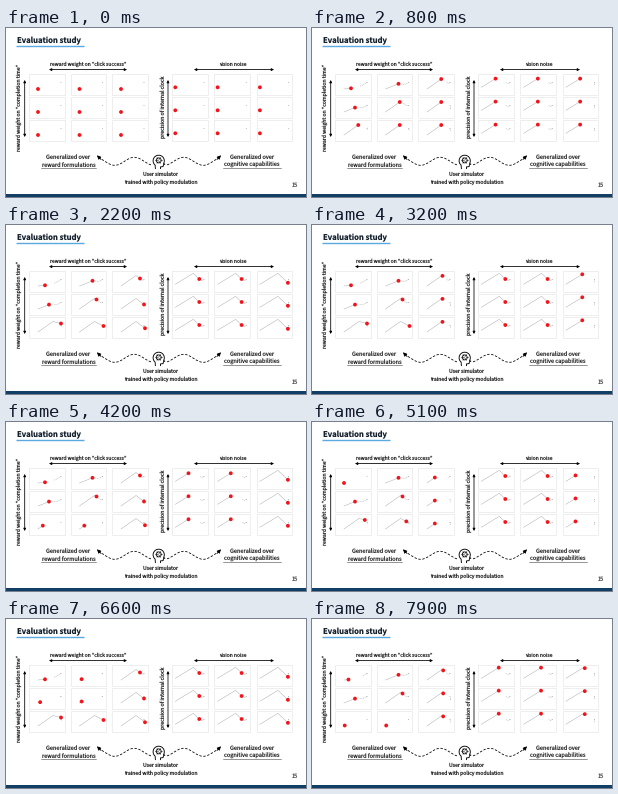
These frames come from a looping animation (300 px wide and 169 px high, 8 s). A matplotlib script:

```python
import numpy as np
import matplotlib.pyplot as plt
from matplotlib.animation import FuncAnimation
from matplotlib.patches import Circle, Rectangle

W, H, DPI = 300, 169, 100
PX = 72 / DPI
FRAMES, STEP = 80, 100
SPEED = 0.0178  # px per ms
INK, NAVY, BLUE, RED = "#303030", "#123f66", "#5aa9e0", "#f3131b"
GREY, PALE = "#b0b0b0", "#dedede"

plt.rcParams["font.family"] = ["Noto Sans CJK JP", "DejaVu Sans"]
plt.rcParams["text.hinting"] = "none"

fig = plt.figure(figsize=(W / DPI, H / DPI), dpi=DPI, facecolor="white")
ax = fig.add_axes([0, 0, 1, 1])
ax.set_xlim(0, W)
ax.set_ylim(H, 0)
ax.axis("off")


def text(x, y, s, size=5, **kw):
    kw = {"ha": "center", "va": "baseline", "color": INK, **kw}
    ax.text(x, y, s, fontsize=size * PX, **kw)


def line(xs, ys, color=INK, lw=0.5, **kw):
    return ax.plot(xs, ys, color=color, lw=lw * PX, **kw)[0]


def arrow(a, b, style="<|-|>", size=3.6):
    ax.annotate("", b, a, arrowprops=dict(
        arrowstyle=style, mutation_scale=size, lw=0.8 * PX,
        color="black", shrinkA=0, shrinkB=0))


def slide():
    text(11, 15, "Evaluation study", 7.7, ha="left", weight="bold", color="#15212d")
    line([10, 78], [18, 18], BLUE, 1.4, solid_capstyle="butt")
    ax.add_patch(Rectangle((0, 166.4), W, 3, color=NAVY, lw=0))
    text(288.5, 159.3, "15", 5.6, color="#555555")

    text(82, 37.6, "reward weight on “click success”")
    text(226.5, 37.6, "vision noise")
    text(13, 79, "reward weight on “completion time”", 5.1, va="center", rotation=90)
    text(157, 79, "precision of internal clock", 5.2, va="center", rotation=90)
    arrow((43, 41.6), (121, 41.6))
    arrow((188, 41.6), (268, 41.6))
    arrow((18.7, 52), (18.7, 109))
    arrow((162, 52), (162, 109))

    for x, half, s in ((62.5, 27.5, "reward formulations"),
                       (246, 29, "cognitive capabilities")):
        text(x, 131.4, "Generalized over", 5.6)
        text(x, 138.8, s, 5.6)
        line([x - half, x + half], [139.9, 139.9])
    text(154.5, 148, "User simulator", 5.1)
    text(154.5, 155.4, "trained with policy modulation", 5.1)


def links():
    s = np.linspace(0, 1, 60)
    y = 133.3 - 4 * np.sin(2.6 * np.pi * s - 0.35 * np.pi)
    for side in (-1, 1):
        line(153 + side * (8 + 51 * s), y, "black", 0.8, dashes=(3, 2))
        x = 153 + side * 58
        arrow((x, y[-1] + 1), (x + side * 4, 127.3), "-|>", 5.5)


def head(x=152.7, y=132.8, r=5.6):
    a = np.radians(np.linspace(130, 390, 30))
    xs = np.r_[-3.3, r * np.cos(a), 6.2, 4.8, 4.4, 1.8, 1.8]
    ys = np.r_[7.8, r * np.sin(a), 3.4, 3.8, 5.8, 6.1, 7.8]
    line(x + xs, y + ys, "black", 0.9)
    ax.add_patch(Circle((x, y - 0.4), 2.5, fill=False, ec="black", lw=0.8 * PX))
    spoke = np.array([1.2, 3.4])
    for a in np.arange(6) * np.pi / 3:
        line(x + np.cos(a) * spoke, y - 0.4 + np.sin(a) * spoke, "black", 0.5)


class Panel:
    """A target rises, bounces and falls until clicked, then starts again."""

    def __init__(self, x, y, start, rise, peak, fall, reach, period):
        self.start, self.rise, self.peak, self.fall = start, rise, peak, fall
        self.reach, self.period = reach, period
        ax.add_patch(Rectangle((x, y), 35.5, 20.8, fc="white", ec=PALE, lw=0.5 * PX))
        self.mark = np.array([x + 32, y + 8.5])
        ax.add_patch(Circle(self.mark, 0.5, color=GREY, lw=0))
        self.trail = line([], [], GREY, 0.5)
        self.cursor = line([], [], GREY, 0.6, dashes=(1.6, 1.2))
        self.dot = Circle(start, 1.9, color=RED, lw=0, zorder=5)
        ax.add_patch(self.dot)

    def at(self, u):
        up, down = np.minimum(u, self.peak), np.maximum(u - self.peak, 0)
        return self.start[0] + u, self.start[1] - self.rise * up + self.fall * down

    def draw(self, t):
        u = min(self.reach, SPEED * (t % self.period))
        self.dot.center = self.at(u)
        self.trail.set_data(*self.at(np.array([0, min(u, self.peak), u])))
        s = np.linspace(0, min(1, u / 14), 12)
        way = np.array(self.at(self.reach)) - self.mark
        x, y = self.mark[:, None] + 0.85 * way[:, None] * s
        self.cursor.set_data(x, y + 1.2 * np.sin(np.pi * s))


def left_panel(row, col):
    # more weight on either reward gives a longer chase
    x, y = 23 + 41.5 * col, 46 + 23 * row
    rise = min(0.7, 0.1 + 0.3 * (row + col))
    reach = min(24, 7 + 6 * col + 4 * row ** 2)
    period = 2550 + 690 * max(row, col) if col < 2 else 2330
    return Panel(x, y, (x + 9, y + 15), rise, 15, 0.25 * (1 + col), reach, period)


def right_panel(row, col):
    x, y = 166 + 42.3 * col, 46 + 23 * row
    reach, period = (24, 3460) if col < 2 else (28, 2280)
    return Panel(x, y, (x + 3.3, y + 13.3), 0.61, 18, 0.95, reach, period)


slide()
links()
head()
panels = [make(row, col) for make in (left_panel, right_panel)
          for row in range(3) for col in range(3)]


def update(n):
    for p in panels:
        p.draw(n * STEP)
    return []


anim = FuncAnimation(fig, update, frames=FRAMES, interval=STEP,
                     repeat=True, repeat_delay=0, blit=False)
plt.show()
```
